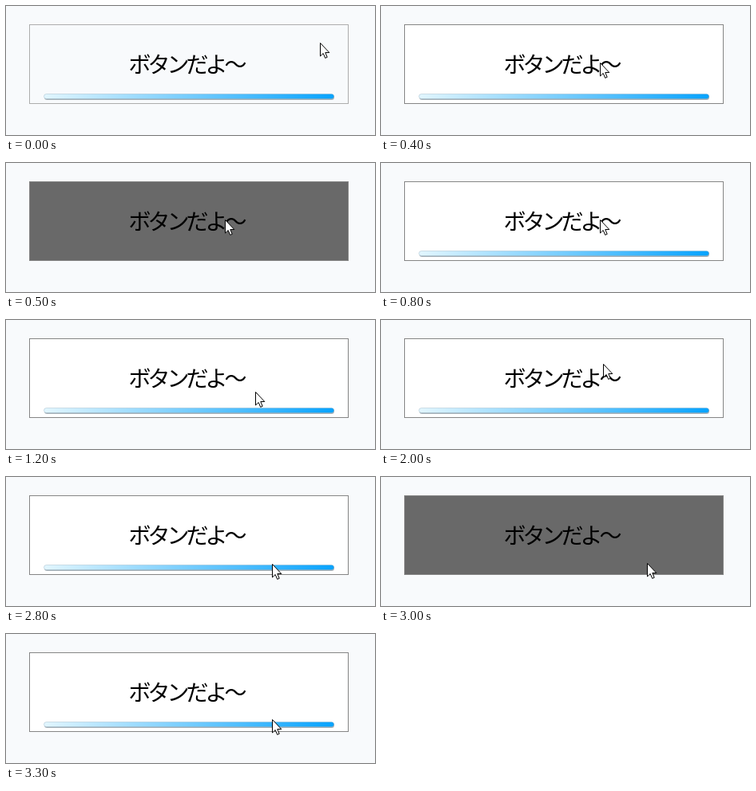
These frames come from a looping animation (462 px wide and 162 px high, 3.4 s). An HTML page:

```html
<!DOCTYPE html>
<html lang="ja">
<head>
<meta charset="utf-8">
<title>Button</title>
<style>
  html, body { margin: 0; width: 100%; height: 100%; overflow: hidden; background: #f8fafc; }
  svg { display: block; }
  text { font: 350 28px "Noto Sans CJK JP", "Noto Sans CJK", sans-serif; letter-spacing: -4px; }
  #box { fill: #f8fafc; stroke: #adadad; }
  .hover #box { fill: #fff; stroke: #858585; }
  .pressed #box { fill: #696969; stroke: #858585; }
  .pressed #bar { display: none; }
</style>
</head>
<body>
<svg id="stage" width="462" height="162" viewBox="0 0 462 162">
  <defs>
    <linearGradient id="blue">
      <stop offset="0" stop-color="#e2f6ff"/>
      <stop offset="1" stop-color="#08a3ff"/>
    </linearGradient>
  </defs>
  <rect id="box" x="29.5" y="23.5" width="399" height="99"/>
  <text x="153.5" y="84">ボタンだよ〜</text>
  <g id="bar">
    <rect x="48" y="111" width="363" height="7" rx="3.5" fill="#8d9aa3" opacity=".75"/>
    <rect x="47.5" y="110.5" width="363" height="6" rx="3" fill="url(#blue)" stroke="#8ba5b5" stroke-opacity=".35"/>
  </g>
  <path id="cursor" d="M.5 .5V17L4.2 13.5L6.7 19.4L9.2 18.3L6.8 12.5H11.8Z" fill="#fff" stroke="#000"/>
</svg>
<script>
  const LOOP = 3400, STEP = 100;
  const stage = document.getElementById("stage");
  const cursor = document.getElementById("cursor");

  // Pointer stops: time, x, y
  const stops = [
    [0, 393, 46], [400, 274, 71], [900, 274, 71], [1500, 349, 108], [1600, 339, 123],
    [1700, 337, 129], [2000, 278, 55], [2100, 314, 62], [2400, 336, 118], [2800, 333, 109], [3300, 333, 107]
  ];
  const ease = k => k * k * (3 - 2 * k);

  function pointerAt(t) {
    const next = stops.findIndex(s => s[0] >= t) || 1;
    const [t0, x0, y0] = stops[next - 1], [t1, x1, y1] = stops[next];
    const k = ease((t - t0) / (t1 - t0));
    return [x0 + (x1 - x0) * k, y0 + (y1 - y0) * k].map(Math.round);
  }

  const inside = ([x, y]) => x >= 29 && x < 429 && y >= 23 && y < 123;
  const isPressed = t => t >= 500 && t < 800 || t >= 3000 && t < 3200;

  // Hover follows the pointer one step late
  function stateAt(t) {
    if (isPressed(t)) return "pressed";
    return t > 0 && inside(pointerAt(t - STEP)) ? "hover" : "";
  }

  function draw(now) {
    const t = Math.floor(now % LOOP / STEP) * STEP;
    stage.setAttribute("class", stateAt(t));
    cursor.setAttribute("transform", `translate(${pointerAt(t)})`);
    requestAnimationFrame(draw);
  }
  draw(0);
</script>
</body>
</html>
```
